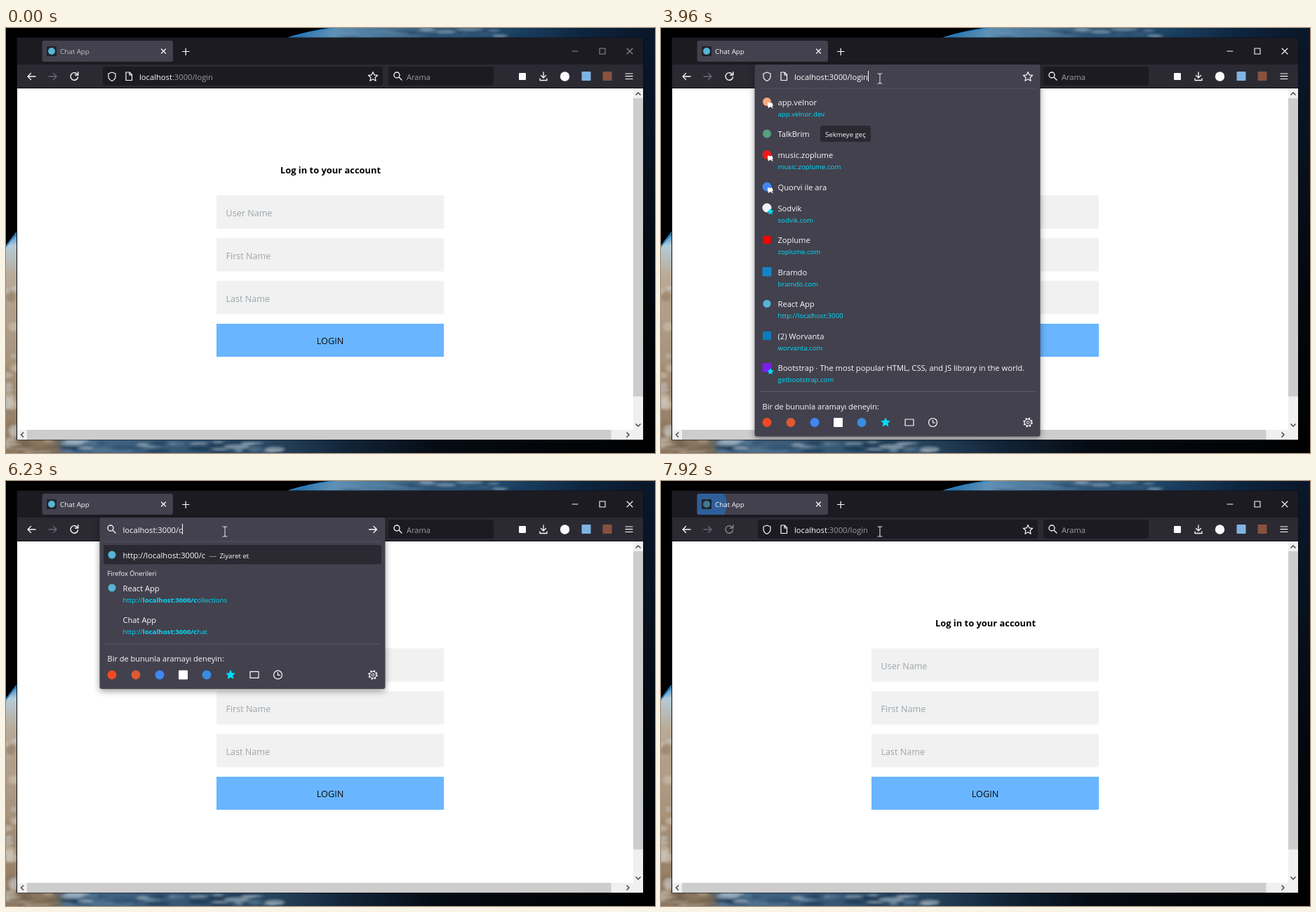
Animation, 925 px wide and 605 px high, one loop 7990 ms. Source, as an HTML page:

```html
<!DOCTYPE html>
<html lang="tr">
<head>
<meta charset="utf-8">
<title>Chat App</title>
<style>
  html, body { margin: 0; width: 100%; height: 100%; overflow: hidden; background: #000; }
  svg { display: block; width: 925px; height: 605px; }
  text { font-family: "Open Sans", "Noto Sans", sans-serif; white-space: pre; }
  .b { font-weight: 700; }
  .panel > .box { filter: drop-shadow(0 3px 5px rgba(0, 0, 0, .4)); }
</style>
</head>
<body>
<svg id="stage" viewBox="0 0 925 605"></svg>
<script>
const LOOP = 7990;
const WHITE = '#fbfbfe', GREY = '#9d9ca6', DARK = '#1c1b22', BAR = '#2b2a33', FIELD = '#42414d', CYAN = '#00ddff';
const REACT = '#55b4d4';

// Drawing helpers: each returns SVG markup
const rect = (x, y, w, h, fill, r = 0) =>
  `<rect x="${x}" y="${y}" width="${w}" height="${h}" rx="${r}" fill="${fill}"/>`;
const dot = (x, y, r, fill) => `<circle cx="${x}" cy="${y}" r="${r}" fill="${fill}"/>`;
const square = (x, y, s, fill) => rect(x - s / 2, y - s / 2, s, s, fill, 1);
const line = (d, color = WHITE, w = 1.2) =>
  `<path d="${d}" fill="none" stroke="${color}" stroke-width="${w}" stroke-linecap="round" stroke-linejoin="round"/>`;
const label = (x, y, size, str, fill = WHITE, attrs = '') =>
  `<text x="${x}" y="${y}" font-size="${size}" fill="${fill}" ${attrs}>${str}</text>`;
const group = (id, body, attrs = '') => `<g id="${id}" ${attrs}>${body}</g>`;

function starPath(x, y, r) {
  const points = Array.from({ length: 10 }, (_, i) => {
    const a = i * Math.PI / 5 - Math.PI / 2, k = i % 2 ? r * .47 : r;
    return `${(x + k * Math.cos(a)).toFixed(1)} ${(y + k * Math.sin(a)).toFixed(1)}`;
  });
  return `M${points.join('L')}Z`;
}
const solidStar = (x, y, r) => `<path d="${starPath(x, y, r)}" fill="${CYAN}"/>`;
const pin = '<path d="M-3-4l4 1 2-1 2 5-2 0 2 4-4-3-3 2-1-4z" fill="#fff"/>';
const searchIcon = x => line(`M${x - 5} 67a4 4 0 1 0 8 0a4 4 0 1 0-8 0M${x + 2} 70l4 4`, WHITE, 1.3);
const siteIcons = line('M151 63l5 2v4q0 4-5 6.500q-5-2.500-5-6.500v-4z')
  + line('M171 63h5l3.500 3.500v8h-8.500zM176 63v4h3.500') + line(starPath(523, 69.5, 7));

// Desktop: a soft globe seen around the window
function desktop() {
  let seed = 7;
  const rnd = () => (seed = seed * 16807 % 2147483647) / 2147483647;
  const blobs = (n, x, y, w, h, rx, ry, colors) => Array.from({ length: n }, () =>
    `<ellipse cx="${(x + rnd() * w).toFixed(1)}" cy="${(y + rnd() * h).toFixed(1)}" rx="${(rx * (.4 + rnd())).toFixed(1)}"
      ry="${(ry * (.4 + rnd())).toFixed(1)}" fill="${colors[Math.floor(rnd() * colors.length)]}" opacity=".5"/>`).join('');
  const gradient = (id, dir, stops) => `<linearGradient id="${id}" ${dir}>`
    + stops.map(([o, c]) => `<stop offset="${o}" stop-color="${c}"/>`).join('') + '</linearGradient>';
  const down = 'x1="0" y1="0" x2="0" y2="1"';
  return '<defs><filter id="soft"><feGaussianBlur stdDeviation="2.2 1.4"/></filter>'
    + gradient('skyTop', '', [[0, '#1d6ba8'], [.12, '#5e91b5'], [.35, '#3d6485'], [.6, '#1e4465'], [.8, '#0d2540'], [1, '#0a1526']])
    + gradient('skyLeft', down, [[0, '#2a7fc0'], [.06, '#b4cbd8'], [.2, '#b9aa97'], [.6, '#a5917a'], [1, '#8d765e']])
    + gradient('skyBottom', '', [[0, '#8d765e'], [.07, '#746858'], [.1, '#466987'], [.38, '#2d4c68'], [.52, '#12263a'], [.66, '#050c14'], [1, '#000']])
    + gradient('skyRight', down, [[0, '#0a182b'], [.3, '#08111e'], [.6, '#04080e'], [1, '#000']])
    + '</defs>' + rect(0, 0, 925, 605, '#000')
    + '<path d="M403 15Q435 5 468 0H925V15Z" fill="url(#skyTop)"/>'
    + rect(907, 0, 18, 605, 'url(#skyRight)') + rect(0, 586, 925, 19, 'url(#skyBottom)')
    + '<path d="M0 312Q9 300 17 291V605H0Z" fill="url(#skyLeft)"/>'
    + '<g filter="url(#soft)">'
    + blobs(22, 490, 0, 270, 13, 22, 2, ['#a9bccb', '#6d90ac', '#24486a', '#163a5c'])
    + blobs(22, 0, 340, 15, 255, 7, 8, ['#d4c9ba', '#b29b82', '#887159', '#c9d1d5'])
    + blobs(20, 0, 588, 65, 16, 14, 3, ['#bcae9a', '#947d64', '#6c5b49'])
    + blobs(45, 85, 588, 310, 16, 14, 3, ['#b9c6cf', '#5f7f9a', '#284a69', '#16344f'])
    + '</g>' + line('M0 311Q9 299 16 290M403 14Q435 4 468 0', '#2f87cb', 2);
}

function chrome() {
  const controls = 'M807 33h8M846 29h8v8h-8zM885 29l8 8M893 29l-8 8';
  return rect(15, 13.5, 893.5, 573, '#0d0d11') + rect(16, 14, 892, 38, DARK) + rect(16, 52, 892, 34, BAR)
    + rect(51.5, 18, 186.500, 30, FIELD, 3)
    + `<clipPath id="tabShape">${rect(51.5, 18, 186.500, 30, FIELD, 3)}</clipPath>`
    + `<g clip-path="url(#tabShape)"><circle id="burst" cx="65" cy="33" r="0" fill="#2f5f9a"/></g>`
    + rect(58, 26, 14, 14, '#20232a', 1) + group('favicon', dot(65, 33, 5, REACT))
    + label(77, 37, 9.8, 'Chat App', WHITE, 'id="tabTitle"')
    + line('M221.500 30l6 6M227.500 30l-6 6M251.500 33.500h9.500M256.200 29v9.500')
    + group('controls', line(controls, WHITE, 1.1))
    + line('M42 69H31M35.500 64.500L31 69l4.500 4.500', WHITE, 1.3)
    + line('M61 69h11M67.500 64.500L72 69l-4.500 4.500', '#6b6a75', 1.3)
    + group('reload', line('M102 66.500a5.300 5.300 0 1 0 .5 3.500M102.800 62.800v4.200h-4.200', WHITE, 1.4))
    + rect(545, 55, 150, 27, DARK, 3) + searchIcon(558) + label(571, 73.5, 11.1, 'Arama', GREY)
    + square(736, 69, 10, WHITE)
    + line('M766 63v7.500M762.500 67.500l3.500 3.500l3.500-3.500M761 72v2.500h10V72', WHITE, 1.3)
    + dot(796.5, 69, 6.7, WHITE) + square(827, 68.5, 13, '#7fb4e2') + square(857, 68.5, 13, '#87523f')
    + line('M883 65h10M883 68.700h10M883 72.500h10')
    + rect(16, 85, 892, 1, '#0f0e14');
}

function page() {
  const field = (y, str) => rect(300, y, 324, 47.3, '#f1f1f1') + label(313.5, y + 30, 12.6, str, '#9ca5aa');
  const chevron = d => line(d, '#505050', 1.7);
  return rect(16, 86, 892, 500, '#fff')
    + group('form', label(462.5, 207, 12.9, 'Log in to your account', '#000', 'class="b" text-anchor="middle"')
      + field(238.3, 'User Name') + field(299.2, 'First Name') + field(360, 'Last Name')
      + rect(300, 421, 324, 47, '#69b5ff') + label(462, 450.3, 12.7, 'LOGIN', '#0b0b0b', 'text-anchor="middle"'))
    + rect(894, 86, 14, 500, '#f0f0f0') + rect(16, 572, 892, 14, '#f0f0f0')
    + rect(894, 100, 14, 424.5, '#cdcdcd') + rect(30, 572, 832.5, 14, '#cdcdcd')
    + chevron('M898 95l3-3l3 3M898 564l3 3l3-3M24.500 576l-3 3l3 3M885 576l3 3l-3 3');
}

// Address bar without its drop-down
const HOST = 'localhost';
const closedBar = (id, path) => group(id, rect(138, 55, 399, 27, DARK, 3) + siteIcons
  + label(190, 73.5, 11.2, `${HOST}<tspan fill="${GREY}">:3000/${path}</tspan>`));
const focusedBar = group('bar-focus', rect(138, 55, 399, 27, FIELD, 3) + siteIcons
  + label(190, 73.5, 11.2, `${HOST}:3000/login`));

function panelBase(sep) {
  const y = sep + 44.5;
  const engines = dot(151, y, 6.5, '#f04a23') + dot(185, y, 6.5, '#de5833') + dot(219, y, 6.5, '#4285f4')
    + square(252.5, y, 13, '#fff') + dot(286, y, 6.5, '#3a8ce0') + solidStar(320, y, 7.3);
  return `<g class="box">${rect(133.500, 52, 407, sep + 12.5, FIELD, 3)}</g>`
    + rect(140, 85.5, 394, 1, '#54535f') + rect(140, sep, 394, 1, '#5b5a66')
    + label(144.5, sep + 26, 11, 'Bir de bununla aramayı deneyin:')
    + engines + line(`M348 ${y - 4.5}h12v9h-12z`)
    + line(`M381.500 ${y}a6 6 0 1 0 12 0a6 6 0 1 0-12 0M387.500 ${y - 3.5}v4h3`)
    + `<circle cx="523" cy="${y}" r="5.700" fill="none" stroke="${WHITE}" stroke-width="2" stroke-dasharray="2.400 2.080"/>`
    + `<circle cx="523" cy="${y}" r="4.600" fill="none" stroke="${WHITE}"/>`
    + `<circle cx="523" cy="${y}" r="1.800" fill="none" stroke="${WHITE}"/>`;
}
const entry = (y, title, url, icon) => icon + label(166.5, y + 4, 11.15, title)
  + (url ? label(166.5, y + 20, 9.65, url, CYAN) : '');
const caret = '<rect class="caret" y="61" width="1" height="15" fill="#fff"/>';

function topSites() {
  const withPin = (icon, y) => icon + `<g transform="translate(155 ${y + 5})">${pin}</g>`;
  const withStar = (icon, y) => icon + solidStar(156, y + 5.5, 5);
  const sites = [
    ['app.velnor', 'app.velnor.dev', y => withPin(dot(151, y, 6, '#f5a97f'), y)],
    ['TalkBrim', '', y => dot(151, y, 6, '#5a9f80')],
    ['music.zoplume', 'music.zoplume.com', y => withPin(dot(151, y, 6.5, '#f01818'), y)],
    ['Quorvi ile ara', '', y => withPin(dot(151, y, 6.5, '#4285f4'), y)],
    ['Sodvik', 'sodvik.com', y => withStar(dot(151, y, 6.5, '#f4f4f6'), y)],
    ['Zoplume', 'zoplume.com', y => square(151, y, 11, '#f00')],
    ['Bramdo', 'bramdo.com', y => square(151, y, 13, '#1583c7')],
    ['React App', 'http://localhost:3000', y => dot(151, y, 5.5, REACT)],
    ['(2) Worvanta', 'worvanta.com', y => square(151, y, 12, '#0a7bbd')],
    ['Bootstrap · The most popular HTML, CSS, and JS library in the world.', 'getbootstrap.com',
      y => withStar(square(151, y, 13, '#7a1fe8'), y)]
  ];
  let y = 105.8;
  const rows = sites.map(([title, url, icon]) => {
    const row = entry(y, title, url, icon(y - .8));
    y += url ? 45.5 : 30;
    return row;
  }).join('');
  return group('bar-sites', panelBase(517) + siteIcons + rows
    + rect(227, 139, 72, 23, BAR, 3) + label(234, 154.5, 9.6, 'Sekmeye geç')
    + '<rect class="selection" x="190" y="61" height="16" fill="#0078d7"/>'
    + label(190, 73.5, 11.2, `${HOST}:3000/login`, '#fff', 'class="typed"') + caret, 'class="panel"');
}

const SHOP = 'Nergis Kile';
const HISTORY = [
  ['React App', 'deail', 1], [SHOP, 'haftanin-secimleri', 1], [SHOP, 'bugun-eklenenler', 1],
  ['React App', 'collections', 1], [SHOP, 'outlet', 1], [SHOP, 'detail/616066ef6cf2ec0212cd038e', 0],
  [SHOP, 'detail/615db40edd5cd9b66fc9cc13', 0], ['Chat App', 'chat', 0], ['React App', 'login?', 1]
];

function typedPanel(path) {
  const typed = `${HOST}:3000/${path}`;
  const found = HISTORY.filter(([, p]) => p.startsWith(path) && p !== path).slice(0, 8);
  const rows = found.map(([title, p, hasIcon], i) => {
    const y = 153 + i * 45.45;
    const url = `http://<tspan class="b">${typed}</tspan>${p.slice(path.length)}`;
    return entry(y, title, url, hasIcon ? dot(151, y - 1, 5.5, REACT) : '');
  }).join('');
  const sep = found.length ? 186 + (found.length - 1) * 45.45 : 123.5;
  return group('typed-' + path, panelBase(sep) + searchIcon(150)
    + line('M517.500 69H528.500M524 64.500l4.500 4.500l-4.500 4.500', WHITE, 1.3)
    + label(166.5, 73.5, 11.2, typed, WHITE, 'class="typed"') + caret
    + rect(139, 91, 396, 27.5, BAR, 3) + dot(151, 105, 5.5, REACT)
    + label(166.5, 109.8, 11.2, `http://${typed}<tspan dx="5" fill="${GREY}">—</tspan><tspan dx="4" font-size="9.600">Ziyaret et</tspan>`)
    + (found.length ? label(144.5, 135.3, 9.3, 'Firefox Önerileri') : '') + rows, 'class="panel"');
}

const TYPED = ['logi', 'log', 'lo', 'l', '', 'c', 'ch', 'cha', 'chat'];
const stage = document.getElementById('stage');
stage.innerHTML = desktop() + chrome() + page()
  + closedBar('bar-idle', 'login') + closedBar('bar-loading', 'chat') + focusedBar + topSites()
  + TYPED.map(typedPanel).join('')
  + group('cursor', dot(-2, -1, 10, '#c8b000') + group('beam',
      line('M-3-7h2l1 1l1-1h2M0-6v12M-3 7h2l1-1l1 1h2', '#d8d8dc', 1.1))
    + '<path id="arrow" d="M0 0v15l3.500-3.300l2.400 5.500l2.200-1l-2.400-5.400h4.800z" fill="#fff" stroke="#000" stroke-width=".8"/>');

const $ = id => document.getElementById(id);
const show = (node, on) => { node.style.display = on ? '' : 'none'; };
const halo = $('cursor').querySelector('circle');
halo.setAttribute('opacity', .85);

// Caret and selection follow the measured text
document.querySelectorAll('.panel').forEach(panel => {
  const typed = panel.querySelector('.typed'), width = typed.getComputedTextLength();
  panel.querySelector('.caret').setAttribute('x', Math.round(+typed.getAttribute('x') + width));
  panel.querySelector('.selection')?.setAttribute('width', width);
});
const carets = document.querySelectorAll('.caret'), selection = document.querySelector('.selection');

const BAR_STATES = [
  [0, 'bar-idle'], [1330, 'bar-focus'], [1400, 'bar-sites'], [4220, 'typed-logi'], [4500, 'typed-log'],
  [4760, 'typed-lo'], [4900, 'typed-l'], [5090, 'typed-'], [6090, 'typed-c'], [6290, 'typed-ch'],
  [6490, 'typed-cha'], [6640, 'typed-chat'], [7580, 'bar-loading'], [7790, 'bar-idle']
];
const barIds = [...new Set(BAR_STATES.map(s => s[1]))];
const CARET_OFF = [[0, 3010], [3490, 3960], [5560, 6090], [6700, 7170]];
const PRESSED = [[1330, 1540], [2280, 3290]];
const MOVES = [
  [300, 868, 600], [650, 588, 423], [850, 380, 200], [960, 250, 76], [1060, 299, 68], [1540, 299, 68],
  [2070, 273, 70], [2140, 271.5, 71], [3010, 271.5, 71], [3090, 306, 70], [3290, 306, 70], [3490, 312, 72]
];
const within = (t, spans) => spans.some(([a, b]) => t >= a && t < b);

function pointer(t) {
  const next = MOVES.findIndex(m => m[0] > t);
  if (next < 1) return MOVES.at(next ? -1 : 0).slice(1);
  const [t0, x0, y0] = MOVES[next - 1], [t1, x1, y1] = MOVES[next], k = (t - t0) / (t1 - t0);
  return [x0 + (x1 - x0) * k, y0 + (y1 - y0) * k];
}

function draw(t) {
  const state = BAR_STATES.findLast(s => t >= s[0])[1];
  barIds.forEach(id => show($(id), id === state));
  carets.forEach(c => show(c, !within(t, CARET_OFF)));
  show(selection, t < 3010);

  const active = t >= 1330, loading = t >= 7580;
  $('tabTitle').setAttribute('opacity', active ? 1 : .7);
  $('controls').setAttribute('opacity', active ? 1 : .5);
  $('reload').setAttribute('opacity', loading ? .45 : 1);
  $('favicon').setAttribute('opacity', loading ? .6 : 1);
  $('burst').setAttribute('r', t > 7790 ? (t - 7790) * .22 : 0);
  show($('form'), !within(t, [[7650, 7790]]));

  const [x, y] = pointer(t), overPage = y > 84;
  $('cursor').setAttribute('transform', `translate(${x} ${y})`);
  show($('cursor'), t >= 300);
  show($('beam'), !overPage);
  show($('arrow'), overPage);
  show(halo, within(t, PRESSED));
}

const start = performance.now();
function tick() {
  draw((performance.now() - start) % LOOP);
  requestAnimationFrame(tick);
}
tick();
</script>
</body>
</html>
```
